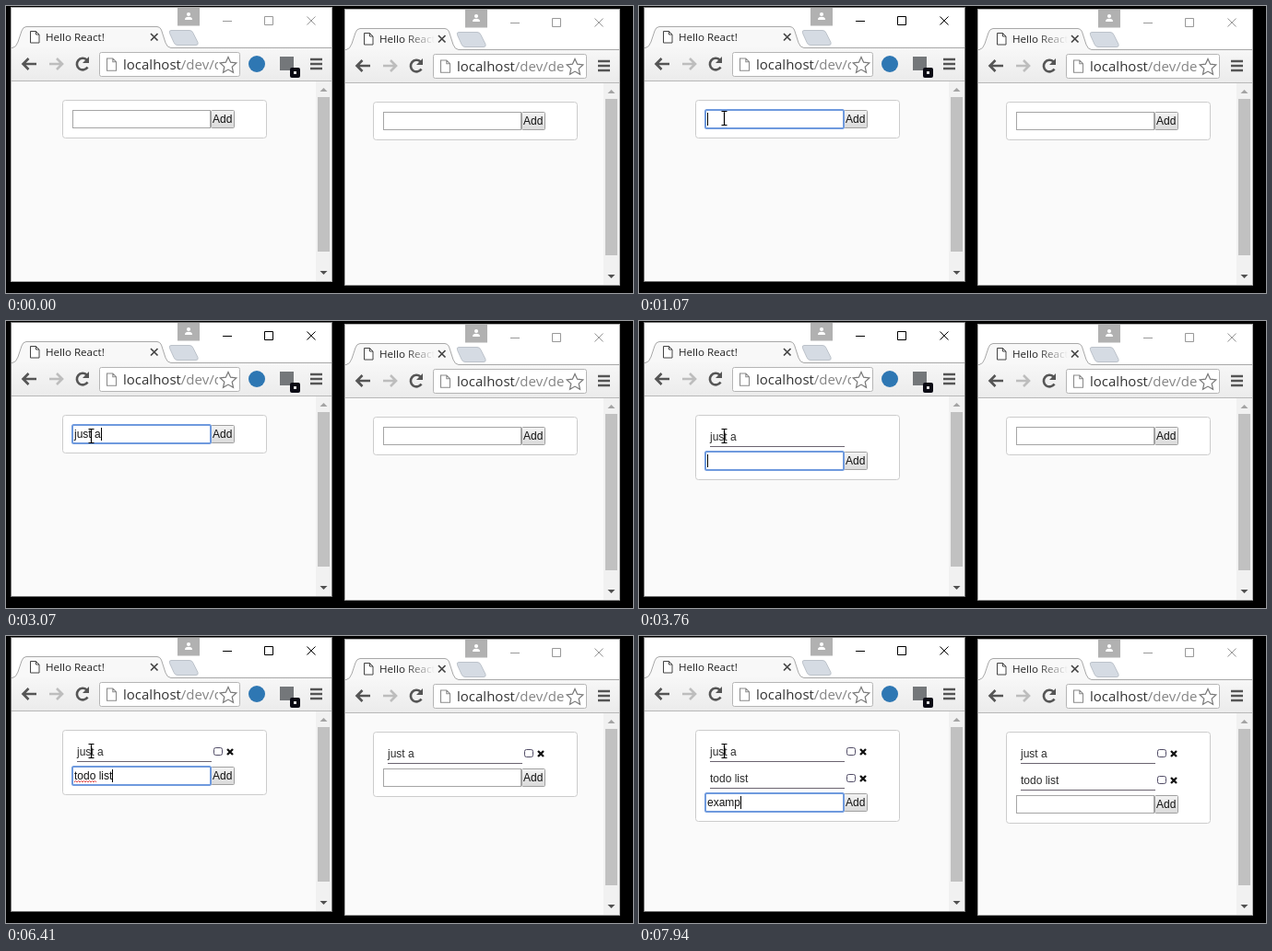
An HTML page for the animation above (8000 ms loop, 680 px wide and 312 px high).

```html
<!DOCTYPE html>
<html lang="en">
<head>
<meta charset="utf-8">
<title>Two synced lists</title>
<style>
html, body { margin: 0; width: 680px; height: 312px; overflow: hidden; background: #000; }
svg { display: block; }
#stage { width: 680px; height: 312px; }
text { white-space: pre; }
.page { font: 12px "Liberation Sans", Arial, sans-serif; fill: #111; }
.title { font: 11.6px "Open Sans", sans-serif; fill: #222; }
.url { font: 15px "Open Sans", sans-serif; fill: #333; }
.path { fill: #858585; }
.line { fill: none; }
</style>
</head>
<body>
<svg id="stage" viewBox="0 0 680 312">
  <defs>
    <linearGradient id="bar" x2="0" y2="1"><stop stop-color="#f7f7f7"/><stop offset="1" stop-color="#ebebeb"/></linearGradient>
    <linearGradient id="btn" x2="0" y2="1"><stop stop-color="#f3f3f3"/><stop offset="1" stop-color="#dadada"/></linearGradient>
    <linearGradient id="fade"><stop stop-color="#f8f8f8" stop-opacity="0"/><stop offset="1" stop-color="#f8f8f8"/></linearGradient>
    <path id="sheet" d="M.5 .5h6l3.5 3.5v9h-9.5zM6.5 .5v3.5h3.5"/>
  </defs>
  <g id="windows"></g>
  <g id="arrow"><path d="M.5 .5v15.5l3.6-3.4 2.6 5.6 2.4-1-2.5-5.5h5z" fill="#fff" stroke="#000"/></g>
  <g id="beam"><path class="line" d="M-3 -7.5h2.5l.5 .5 .5-.5h2.5M-3 7.5h2.5l.5-.5 .5 .5h2.5M0 -7v14" stroke="#000" stroke-width="1.2"/></g>
</svg>
<script>
const LOOP = 8000, FOCUS = 990, ROW = 29;
const $ = id => document.getElementById(id);

const entries = [
  { text: 'just a', keys: [2150, 2380, 2450, 2680, 2830, 3070], enter: 3760 },
  { text: 'todo list', keys: [4690, 4840, 5300, 5400, 5620, 5850, 6080, 6160, 6410], enter: 6630 },
  { text: 'examp', keys: [7250, 7480, 7640, 7710, 7940], enter: Infinity }
];
const caretOff = [[1530, 2070], [4380, 4690], [7170, 7250]];

// time, x, y, each held until the next
const pointer = [
  [70, 455, 275], [150, 425, 262], [230, 362, 235], [300, 284, 202], [380, 204, 168], [460, 136, 139],
  [530, 88, 118], [610, 65, 109], [690, 77, 117], [760, 85, 120], [840, 88, 120], [910, 90, 121],
  [990, 91, 121], [1070, 92, 122], [1230, 92, 123], [1300, 92, 125]
];

const wins = [
  { id: 'a', x: 6, y: 2, w: 348, h: 298, boxEnd: 248, tools: true },
  { id: 'b', x: 368, y: 4, w: 298, h: 300, boxEnd: 262 }
];

function windowMarkup({ id, x, y, w, h, boxEnd, tools }) {
  const d = w - 348;   // narrower windows have a shorter tab
  return `<g transform="translate(${x} ${y})">
    <rect width="${w}" height="${h}" fill="#fff"/>
    <rect y="43" width="${w}" height="37" fill="url(#bar)"/>
    <path d="M0 43.5H1Q5 43 7 37L11 25Q12.500 20.500 16 20.500H${158 + d}Q${161 + d} 20.500 ${162.5 + d} 24L${167 + d} 38Q${169 + d} 43.500 ${173 + d} 43.500H${w}" fill="#f8f8f8" stroke="#a8a8a8"/>
    <path d="M${173 + d} 24.500h20q3 0 4 3l5 10q1 3-2 3h-20q-3 0-4-3l-4.500-10q-1-3 1.500-3z" fill="#d5dbe3" stroke="#bcc2ca"/>
    <use href="#sheet" x="20" y="25" fill="#fff" stroke="#444"/>
    <svg x="37" y="22" width="${110 + d}" height="20"><text class="title" y="14">Hello React!</text>
      ${d ? '<rect x="28" width="32" height="20" fill="url(#fade)"/>' : ''}</svg>
    <path d="M${151 + d} 28l7.500 7.500m0-7.500l-7.500 7.500" stroke="#444" stroke-width="1.700"/>
    <g transform="translate(${w} 0)">
      <rect x="-168" width="24" height="19.500" fill="#b1b1b1"/>
      <circle cx="-156" cy="7" r="2.100" fill="#fff"/><path d="M-160 13q0-3.200 4-3.200t4 3.200z" fill="#fff"/>
      <path id="ctl-${id}" class="line" d="M-119 14.500h10M-73.500 9.500h9v9h-9zM-27.500 9.500l9 9m0-9l-9 9"/>
      <path d="M-24 56h13m-13 5h13m-13 5h13" stroke="#555" stroke-width="2.600"/>
    </g>
    <g class="line" stroke="#555" stroke-width="2.600">
      <path d="M27 61H12.500M18.500 55l-6 6 6 6"/>
      <path d="M41 61H55M49 55l6 6-6 6" stroke="#bdbdbd"/>
      <path d="M82.500 64.500A6.300 6.300 0 1 1 81.500 56.500"/><path d="M84 53v7h-7z" fill="#555" stroke="none"/>
    </g>
    <rect x="95.500" y="48.500" width="${boxEnd - 96}" height="26" rx="2" fill="#fff" stroke="#b5b5b5"/>
    <use href="#sheet" transform="translate(103 54.500) scale(1.050)" fill="#fff" stroke="#8a8a8a"/>
    <svg x="121" y="49" width="${boxEnd - 145}" height="25"><text class="url" y="18">localhost<tspan class="path">/dev/demo</tspan></text></svg>
    <path class="line" transform="translate(${boxEnd - 13} 62)" d="M0 -8.500l2.600 5.700 6.200.7-4.600 4.200 1.300 6.200-5.500-3.200-5.500 3.200 1.300-6.200-4.600-4.200 6.200-.7z" stroke="#777" stroke-width="1.200"/>
    ${tools ? `<circle cx="266" cy="61" r="9" fill="#2e77b3"/><rect x="291" y="53" width="15" height="15" fill="#74777a"/>
      <rect x="302" y="65" width="11" height="11" rx="2" fill="#0a0a14"/><rect x="306" y="69" width="3" height="3" fill="#ddd"/>` : ''}
    <rect y="79" width="${w}" height="1" fill="#b8b8b8"/>
    <rect y="80" width="${w}" height="${h - 80}" fill="#fafafa"/>
    <g transform="translate(${w} 0)">
      <rect x="-18" y="80" width="17" height="${h - 81}" fill="#f1f1f1"/>
      <rect x="-16" y="97" width="13" height="${h - 130}" fill="#c1c1c1"/>
      <path d="M-13.500 91l4-4 4 4z" fill="#a3a3a3"/><path d="M-13.500 ${h - 12}l4 4 4-4z" fill="#505050"/>
    </g>
    <rect id="edge-${id}" class="line" x="-.5" y="-.5" width="${w}" height="${h}" stroke="#aaa"/>
    <g id="card-${id}" class="page" transform="translate(${55 + d / 2} 100)"></g>
  </g>`;
}

const measure = document.createElement('canvas').getContext('2d');
measure.font = '12px "Liberation Sans", Arial, sans-serif';

const itemMarkup = (text, i, checks) => `<g transform="translate(0 ${i * ROW})">
  <text x="16" y="28" fill="#2c2c2c">${text}</text>
  <path d="M16 34.500h146" stroke="#6b6470"/>
  ${checks ? `<rect x="164.500" y="19.500" width="9" height="8" rx="2" fill="#fff" stroke="#514c66"/>
    <path d="M179 21l6 6m0-6l-6 6" stroke="#111" stroke-width="2.300"/>` : ''}</g>`;

function cardMarkup({ items, checks, text = '', focus, caret }) {
  const n = items.length;
  const caretX = 13 + Math.round(measure.measureText(text).width);
  const frame = focus
    ? '<rect x="11" y="11" width="150" height="20" rx="1.500" fill="#fff" stroke="#6f9ade" stroke-width="2"/>'
    : '<rect x="11.500" y="11.500" width="149" height="19" fill="#fff" stroke="#a5a5a5"/>';
  return `<rect x=".5" y=".5" width="221" height="${41 + n * ROW}" rx="3" fill="#fff" stroke="#ccc"/>
    ${items.map((item, i) => itemMarkup(item, i, i < checks)).join('')}
    <g transform="translate(0 ${n * ROW})">
      <rect x="161.500" y="11.500" width="25" height="19" rx="1" fill="url(#btn)" stroke="#a0a0a0"/>
      <text x="163" y="25">Add</text>${frame}
      <text x="13" y="25">${text}</text>
      ${text.startsWith('todo ') ? `<path class="line" d="M13 28${'l1.500-1.500 1.500 1.500'.repeat(8)}" stroke="#d33" stroke-width=".9"/>` : ''}
      ${caret ? `<rect x="${caretX}" y="14" width="1" height="14" fill="#000"/>` : ''}
    </g>`;
}

function states(t) {
  const added = delay => entries.filter(e => t >= e.enter + delay).map(e => e.text);
  const mine = added(0);
  const entry = entries[mine.length];
  const focus = t >= FOCUS;
  const firstSync = t < entries[1].enter ? 80 : 0;
  const theirs = added(firstSync);
  return {
    a: {
      items: mine, checks: added(firstSync).length, focus,
      text: entry.text.slice(0, entry.keys.filter(k => t >= k).length),
      caret: focus && !caretOff.some(([from, to]) => t >= from && t < to)
    },
    b: { items: theirs, checks: added(firstSync && 150).length }
  };
}

function place(id, shown, x, y) {
  $(id).setAttribute('visibility', shown ? 'visible' : 'hidden');
  $(id).setAttribute('transform', `translate(${x} ${y})`);
}

function drawPointer(t) {
  const [, x, y] = pointer.filter(p => t >= p[0]).pop() || [0, -50, -50];
  const overField = x >= 72 && x < 222 && y >= 113 && y < 133;
  place('beam', overField, x + .5, y);
  place('arrow', !overField, x, y);
}

$('windows').innerHTML = wins.map(windowMarkup).join('');
const drawn = {};
function draw(now) {
  const t = now % LOOP;
  const state = states(t);
  for (const id in state) {
    const html = cardMarkup(state[id]);
    if (html !== drawn[id]) $('card-' + id).innerHTML = drawn[id] = html;
    $('ctl-' + id).setAttribute('stroke', state[id].focus ? '#000' : '#999');
    $('edge-' + id).setAttribute('stroke', state[id].focus ? '#777' : '#aaa');
  }
  drawPointer(t);
}

const start = performance.now();
(function tick() {
  draw(performance.now() - start);
  requestAnimationFrame(tick);
})();
</script>
</body>
</html>
```
